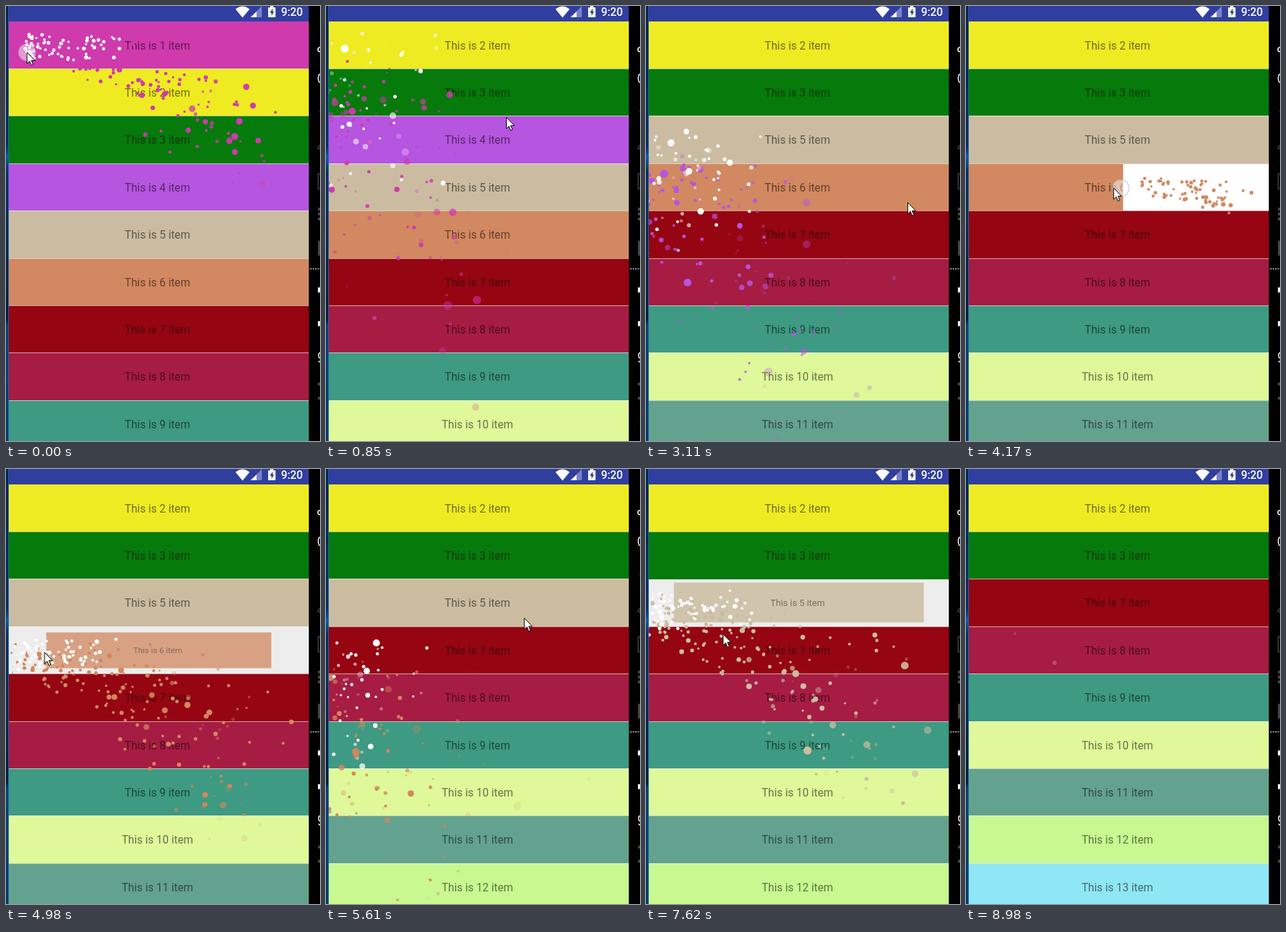
An HTML page that plays this animation: 448 by 619 pixels, repeating every 9.08 s.

```html
<!DOCTYPE html>
<html lang="en">
<head>
<meta charset="utf-8">
<title>Swipe to dissolve</title>
<style>
  html, body { margin: 0; width: 100%; height: 100%; overflow: hidden; background: #000; }
  svg { display: block; width: 448px; height: 619px; }
  text { font-family: Roboto, "Noto Sans", sans-serif; }
</style>
</head>
<body>
<svg viewBox="0 0 448 619" xmlns="http://www.w3.org/2000/svg">
  <defs>
    <linearGradient id="desk" x1="0" y1="0" x2="0" y2="1">
      <stop offset="0" stop-color="#0a2149"/>
      <stop offset=".32" stop-color="#052c5e"/>
      <stop offset=".348" stop-color="#0c5aa6"/>
      <stop offset=".38" stop-color="#06305f"/>
      <stop offset=".72" stop-color="#031a38"/>
      <stop offset=".735" stop-color="#0a3f75"/>
      <stop offset="1" stop-color="#06386a"/>
    </linearGradient>
    <clipPath id="screen"><rect x="4" y="22" width="428" height="597"/></clipPath>
  </defs>
  <rect width="448" height="619" fill="#000"/>
  <rect width="4" height="619" fill="url(#desk)"/>
  <rect x="3" width="1" height="619" fill="#1c66ac"/>

  <g clip-path="url(#screen)">
    <rect x="4" y="22" width="428" height="597" fill="#ededed"/>
    <g id="rows"></g>
    <rect id="cover" fill="#fff"/>
    <g id="dust"></g>
  </g>

  <g fill="#fff">
    <rect x="4" width="428" height="22" fill="#303f9f"/>
    <path d="M327.500 4.500Q337.500 -3.500 347.500 4.500L337.500 16.500Z"/>
    <path d="M365 0V16H349Z" opacity=".35"/>
    <path d="M357.500 8V16H349Z"/>
    <path d="M374 2H377V0H381.500V2H384.500V16H374Z"/>
    <path d="M380.500 3.500L376.300 9.800H378.800V14L382.600 7.800H380.500Z" fill="#303f9f"/>
    <text x="392.500" y="14" font-size="15.700" font-weight="500">9:20</text>
  </g>

  <g fill="none" stroke="#fff" stroke-width="1.500">
    <path d="M448 59Q445 59 445 62T448 65M448 97Q445.500 98 445.500 103T448 109"/>
    <path d="M448 493Q445.500 495 446 498T448 501M446 505L448 507"/>
    <path d="M445 404H448M445 452H448" stroke-width="7"/>
    <path d="M434 374H448" stroke="#ccc" stroke-dasharray="2 1.500"/>
    <g stroke="#444">
      <path d="M448 239H445.500V260H448M448 198L445 202L448 204M447 150H448"/>
      <path d="M445 289H448M445 296H448M445 303H448M445 538H448M445 558H448" stroke-width="4"/>
      <path d="M446.500 334V355" stroke-width="3"/>
    </g>
  </g>

  <circle id="touch" r="12" fill="#fff" fill-opacity=".48" stroke="#a9a6bd" stroke-opacity=".4" stroke-width="2"/>
  <path id="cursor" d="M0 0V16L3.700 12.500L6.300 18.500L8.800 17.400L6.200 11.600H11.300Z" fill="#fff" stroke="#000"/>
</svg>

<script>
const LOOP = 9080, LEFT = 4, WIDTH = 428, TOP = 22, PITCH = 67.4, ROW = 68;
const SWEEP = 1030, SHRINK = 300, CLOSE = 250;
const COLORS = ['#cf3aad', '#efeb22', '#067a0b', '#b655e0', '#cbbca1', '#d28860', '#960512',
  '#a61c42', '#3e9a82', '#dff899', '#63a28e', '#c8f88f', '#8fe6f5'];

// Each swipe: item index, its place in the list, wipe start, removal start
const SWIPES = [
  { item: 0, slot: 0, start: -1130, remove: 60 },
  { item: 3, slot: 2, start: 1340, remove: 2450 },
  { item: 5, slot: 3, start: 3690, remove: 4905 },
  { item: 4, slot: 2, start: 6250, remove: 7570 }
];

const STEPS = [[0, 0, 1], [150, 1090, 8], [1210, 2170, 8], [2320, 3260, 8], [3380, 4320, 8],
  [4470, 5490, 9], [5610, 6540, 8], [6660, 7620, 8], [7770, 8710, 8], [8860, 8980, 2]];

// Pointer path: time, x, y
const POINTER = [[0, 30, 66], [150, 30, 66], [700, 210, 150], [1200, 405, 185], [1340, 390, 183],
  [2170, 39, 182], [2370, 25, 182], [2500, 60, 200], [3110, 373, 280], [3260, 378, 278],
  [3550, 400, 262], [3750, 385, 260], [4650, 25, 258], [4800, 30, 260], [4980, 55, 261],
  [5500, 250, 220], [6000, 400, 185], [6300, 370, 183], [6660, 194, 182], [7200, 25, 188],
  [7400, 40, 205], [7620, 110, 235], [8200, 420, 260], [8400, 427, 262]];
const POINTER_GONE = 8400;

const $ = id => document.getElementById(id);
const clamp = v => Math.max(0, Math.min(1, v));
const ease = v => (1 - Math.cos(Math.PI * clamp(v))) / 2;
const rowTop = slot => Math.floor(TOP + slot * PITCH);

function set(el, attrs) {
  for (const name in attrs) el.setAttribute(name, attrs[name]);
  return el;
}
function make(tag, parent, attrs) {
  return parent.appendChild(set(document.createElementNS('http://www.w3.org/2000/svg', tag), attrs));
}
function show(el, visible) {
  el.style.display = visible ? '' : 'none';
}

let seed = 20177;
function random(min = 0, max = 1) {
  seed = (seed * 1664525 + 1013904223) % 4294967296;
  return min + (max - min) * seed / 4294967296;
}

const rows = COLORS.map((color, i) => {
  const group = make('g', $('rows'), {});
  const box = { x: -WIDTH / 2, y: -ROW / 2, width: WIDTH };
  make('rect', group, { ...box, height: ROW, fill: color });
  const divider = make('rect', group, { ...box, height: 1, fill: '#ededed' });
  make('text', group, { x: -2, y: 5.8, 'text-anchor': 'middle', 'font-size': 15.7, 'fill-opacity': .54 })
    .textContent = `This is ${i + 1} item`;
  return { group, divider };
});

function makeGrain(swipe, white) {
  const u = white ? random(.85, 1) : random(.08, 1);
  return {
    born: swipe.start + u * SWEEP + random(0, 90),
    x: LEFT + (white ? 32 + 130 * random() ** 1.7 : WIDTH * (1 - u) + random(0, 25)),
    y: TOP + swipe.slot * PITCH + random(20, 53),
    vx: random(-110, 10),
    vy: random(-35, 20),
    gravity: white ? 40 + 400 * random() ** 2 : random(90, 460),
    radius: random(1.5, 2.6),
    growth: random() ** (white ? 6 : 4) * 3.5,
    life: white ? random(.9, 1.85) : random(1.1, 1.75),
    el: make('circle', $('dust'), { fill: white ? '#fff' : COLORS[swipe.item] })
  };
}
const grains = SWIPES.flatMap(swipe =>
  Array.from({ length: 245 }, (_, i) => makeGrain(swipe, i >= 175)));

// Steps are slightly uneven, so a step may begin a little early
function heldTime(t) {
  const [first, last, count] = STEPS.filter(s => s[0] <= t).pop();
  if (count === 1) return first;
  const step = (last - first) / (count - 1);
  return first + step * Math.min(count - 1, Math.floor((t - first) / step + .15));
}

function pointerAt(t) {
  const next = POINTER.findIndex(p => p[0] > t);
  if (next < 1) return POINTER[next < 0 ? POINTER.length - 1 : 0].slice(1);
  const [a, b] = [POINTER[next - 1], POINTER[next]];
  const k = (t - a[0]) / (b[0] - a[0]);
  return [a[1] + (b[1] - a[1]) * k, a[2] + (b[2] - a[2]) * k];
}

function drawRows(t) {
  rows.forEach(({ group, divider }, i) => {
    let slot = i, scale = 1;
    for (const { item, remove } of SWIPES) {
      if (item < i) slot -= ease((t - remove - SHRINK) / CLOSE);
      if (item === i) scale = 1 - clamp((t - remove) / SHRINK);
    }
    show(group, scale > 0);
    show(divider, slot > 0.001 && scale === 1);
    const y = rowTop(slot + 1e-6) + ROW / 2;
    set(group, { transform: `translate(${LEFT + WIDTH / 2} ${y}) scale(${scale})`, opacity: scale });
    set(divider, { opacity: .65 });
  });
}

function drawWipe(t) {
  const swipe = SWIPES.find(s => t >= s.start && t < s.start + SWEEP);
  show($('cover'), swipe);
  if (!swipe) return;
  const edge = 432 * (1 - (t - swipe.start) / SWEEP);
  const y = rowTop(swipe.slot) + 1;
  set($('cover'), { x: edge, y, width: Math.max(0, 432 - edge), height: rowTop(swipe.slot + 1) - y });
}

function drawGrains(t) {
  for (const g of grains) {
    const age = (t - g.born) / 1000;
    const alive = age >= 0 && age < g.life;
    show(g.el, alive);
    if (!alive) continue;
    set(g.el, {
      cx: g.x + g.vx * age,
      cy: g.y + g.vy * age + g.gravity * age * age / 2,
      r: g.radius + g.growth * age,
      opacity: Math.min(1, (g.life - age) / .5)
    });
  }
}

function drawPointer(t) {
  show($('cursor'), t < POINTER_GONE);
  set($('cursor'), { transform: `translate(${pointerAt(t)})` });
  show($('touch'), SWIPES.some(s => t > s.start - 60 && t < s.start + SWEEP + 120));
  const [cx, cy] = pointerAt(t - 25);
  set($('touch'), { cx, cy });
}

let drawn = -1;
const origin = performance.now();
function frame(now) {
  const t = heldTime(Math.max(0, now - origin) % LOOP);
  if (t !== drawn) {
    drawRows(t);
    drawWipe(t);
    drawGrains(t);
    drawPointer(t);
    drawn = t;
  }
  requestAnimationFrame(frame);
}
frame(origin);
</script>
</body>
</html>
```
